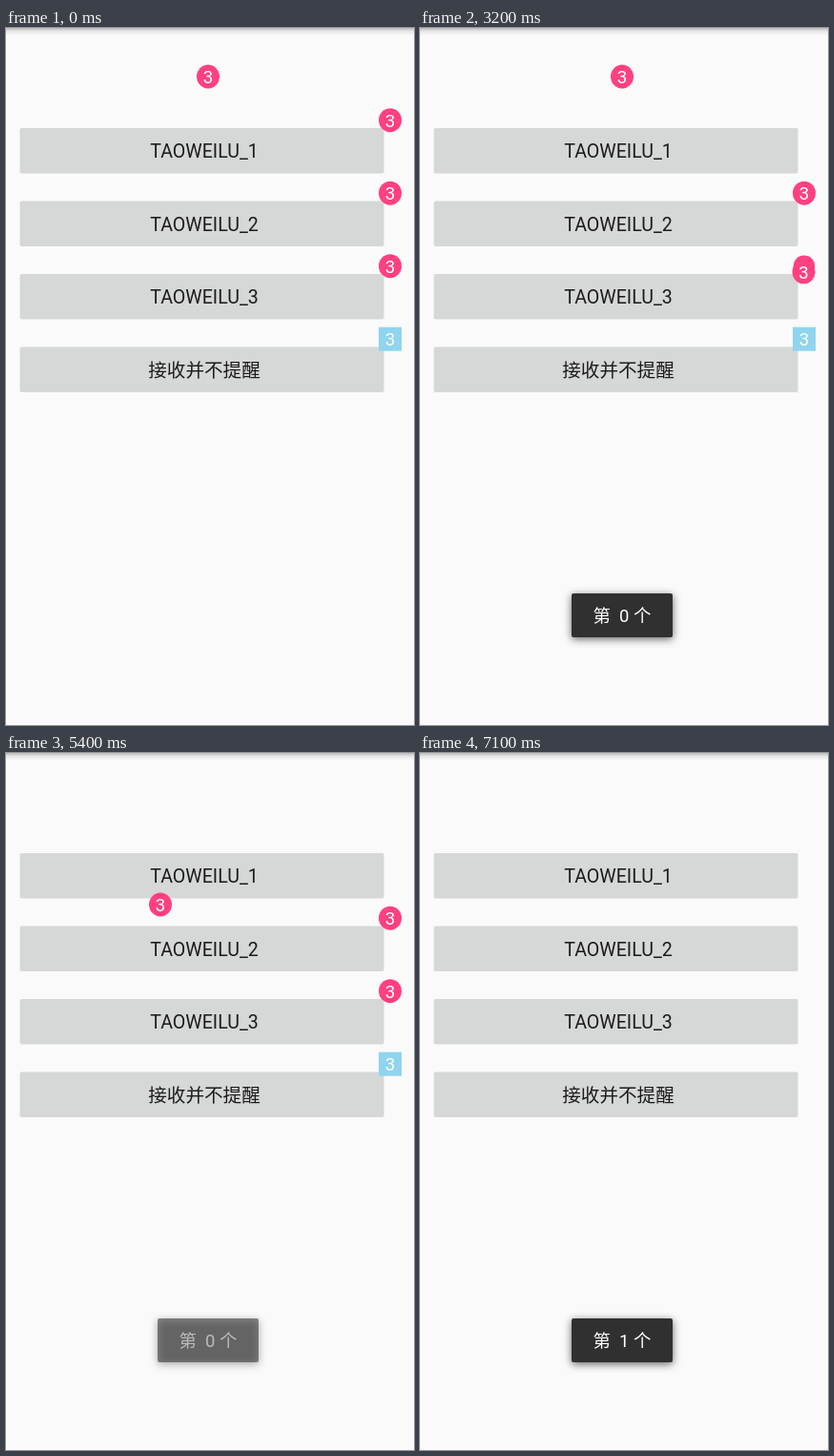
An HTML page with a canvas for the animation above (8100 ms loop, 428 by 731 pixels).

```html
<!DOCTYPE html>
<html lang="zh">
<head>
<meta charset="utf-8">
<style>
  html, body { margin: 0; width: 100%; height: 100%; overflow: hidden; background: #fafafa; }
  canvas { display: block; }
</style>
</head>
<body>
<canvas id="stage" width="428" height="731"></canvas>
<script>
const ctx = document.getElementById('stage').getContext('2d');
const LOOP = 8100, STEP = 100;
const PINK = '#ff4081', BLUE = '#90d4ee';
const FONT = 'Roboto, "Noto Sans CJK SC", "Noto Sans CJK", sans-serif';
const ROW = 76.5, RX = 12, RY = 12.5, STRETCH_LIMIT = 80;

const labels = ['TAOWEILU_1', 'TAOWEILU_2', 'TAOWEILU_3', '接收并不提醒'];

// Each path point is [time, dx, dy], measured from the badge's home.
const badges = [
  { x: 212, y: 51, gone: 6100, path: [[4900, 0, 0], [5400, -50, 108], [5600, -55, 120]] },
  { x: 403, y: 96.7, gone: 1700, path: [[600, 0, 0], [1100, -50, 142]] },
  { x: 403, y: 96.7 + ROW, gone: 6600, path: [
    [2200, 0, 0], [2600, -29, 63], [2700, -5, 10], [2800, 1.5, -4], [2900, 0, -1],
    [3100, 0, -1], [3200, 0, 0], [6200, 0, 0], [6500, -68, -21]] },
  { x: 403, y: 96.7 + 2 * ROW, gone: 6500, path: [
    [3100, 0, 0], [3700, -3, 37], [3800, 0, 5], [3900, 0, -1], [4000, 0, -1], [4100, 0, 0]] },
  { x: 403, y: 96.7 + 3 * ROW, gone: 6500, square: true, path: [[0, 0, 0]] }
];

const toasts = [
  { text: '第\u00a0\u00a00\u00a0个', from: 1870, out: 5000 },
  { text: '第\u00a0\u00a01\u00a0个', from: 6620, out: LOOP }
];

const clamp = v => Math.max(0, Math.min(1, v));

function offsetAt(path, time) {
  const next = path.findIndex(p => p[0] > time);
  if (next === 0) return [0, 0];
  if (next < 0) return path[path.length - 1].slice(1);
  const a = path[next - 1], b = path[next];
  const k = (time - a[0]) / (b[0] - a[0]);
  return [a[1] + (b[1] - a[1]) * k, a[2] + (b[2] - a[2]) * k];
}

function write(text, x, baseline, size, color) {
  ctx.font = `${size}px ${FONT}`;
  ctx.textAlign = 'center';
  ctx.fillStyle = color;
  ctx.fillText(text, x, baseline);
}

function box(x, y, w, h, radius) {
  ctx.beginPath();
  ctx.roundRect(x, y, w, h, radius);
  ctx.fill();
}

function oval(x, y, rx, ry) {
  ctx.beginPath();
  ctx.ellipse(x, y, rx, ry, 0, 0, 2 * Math.PI);
  ctx.fill();
}

// Elastic neck between the home point and a badge that is still attached.
function drawNeck(x, y, dx, dy) {
  const distance = Math.hypot(dx, dy);
  if (distance < 3 || distance > STRETCH_LIMIT) return;
  const r = RX * (1 - 0.8 * distance / STRETCH_LIMIT);
  const nx = -dy / distance, ny = dx / distance;
  const mx = x + dx / 2, my = y + dy / 2;
  oval(x, y, r, r);
  ctx.beginPath();
  ctx.moveTo(x + nx * r, y + ny * r);
  ctx.quadraticCurveTo(mx, my, x + dx + nx * RX, y + dy + ny * RX);
  ctx.lineTo(x + dx - nx * RX, y + dy - ny * RX);
  ctx.quadraticCurveTo(mx, my, x - nx * r, y - ny * r);
  ctx.fill();
}

function drawBadge({ x, y, gone, path, square }, time) {
  if (time >= gone) return;
  const [dx, dy] = offsetAt(path, time);
  ctx.fillStyle = square ? BLUE : PINK;
  if (square) {
    ctx.fillRect(x - RX, y - RY, 2 * RX, 2 * RY);
  } else {
    drawNeck(x, y, dx, dy);
    oval(x + dx, y + dy, RX, RY);
  }
  write('3', x + dx, y + dy + 6.8, 18.6, '#fff');
}

function drawToast({ text, from, out }, time) {
  const fadeIn = 1 - (1 - clamp((time - from) / 500)) ** 2;
  const fadeOut = 1 - clamp((time - out) / 600) ** 2;
  ctx.save();
  ctx.globalAlpha = fadeIn * fadeOut;
  ctx.shadowColor = 'rgba(0,0,0,.6)';
  ctx.shadowBlur = 8;
  ctx.shadowOffsetY = 2;
  ctx.fillStyle = '#303030';
  box(159, 593, 106, 46, 2);
  ctx.shadowColor = 'transparent';
  write(text, 212, 623.3, 18.4, '#fff');
  ctx.restore();
}

function drawScreen() {
  ctx.fillStyle = '#fafafa';
  ctx.fillRect(0, 0, 428, 731);
  const shade = ctx.createLinearGradient(0, 0, 0, 8);
  shade.addColorStop(0, '#b8b8b8');
  shade.addColorStop(0.4, '#e4e4e4');
  shade.addColorStop(1, '#fafafa');
  ctx.fillStyle = shade;
  ctx.fillRect(0, 0, 428, 8);
  labels.forEach((label, i) => {
    const y = 105 + i * ROW;
    ctx.fillStyle = '#d6d7d7';
    box(14.5, y, 382, 47.5, 2);
    write(label, 208, y + 31, 19.6, '#1c1c1c');
  });
}

function render(now) {
  const time = Math.floor((now % LOOP) / STEP) * STEP;
  drawScreen();
  badges.forEach(badge => drawBadge(badge, time));
  toasts.forEach(toast => drawToast(toast, time));
}

let start;
function tick(now) {
  start ??= now;
  render(now - start);
  requestAnimationFrame(tick);
}
requestAnimationFrame(tick);
</script>
</body>
</html>
```
